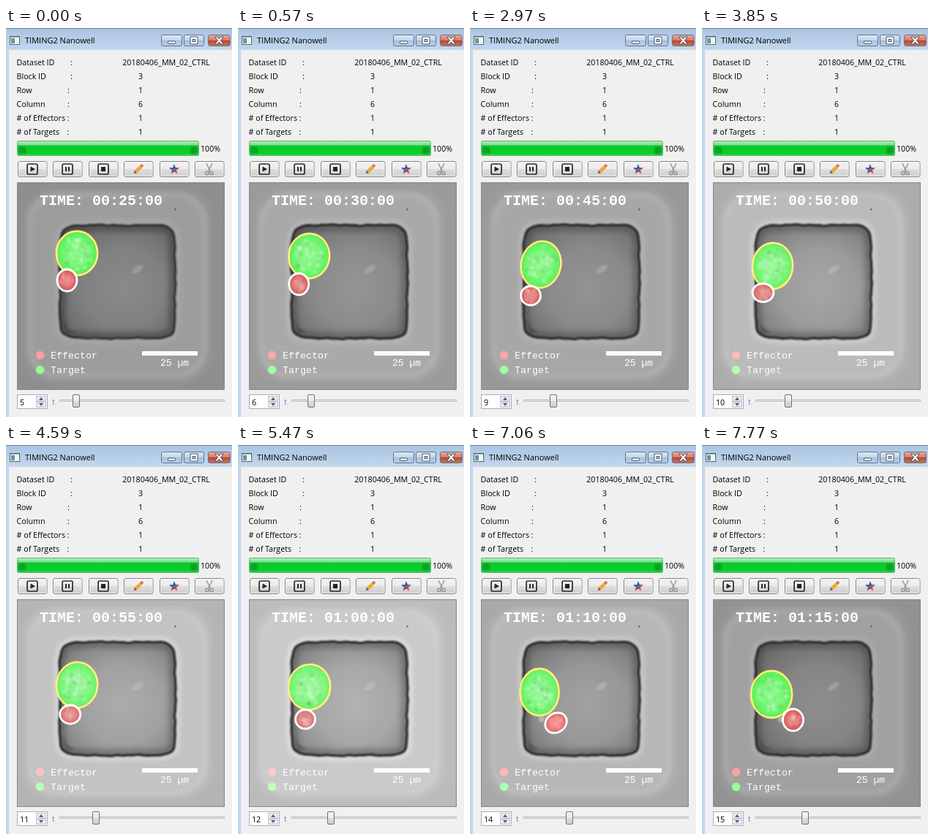
Write an HTML page that moves like this. It is 309 by 532 pixels and loops after 8 s.

```html
<!DOCTYPE html>
<html lang="en">
<head>
<meta charset="utf-8">
<title>Nanowell viewer</title>
<style>
html, body { margin: 0; width: 100%; height: 100%; overflow: hidden; background: #f0f0f0; }
svg { display: block; width: 309px; height: 532px; }
text { font: 10.7px "Open Sans", sans-serif; fill: #000; white-space: pre; }
.title { font-size: 11px; }
.mono { font: 13.33px "Liberation Mono", monospace; fill: #fff; }
.clock { font-size: 20px; font-weight: bold; }
.scale { font-size: 13px; }
</style>
</head>
<body>
<svg viewBox="0 0 309 532">
  <defs>
    <linearGradient id="bar" x2="0" y2="1">
      <stop stop-color="#a9c4e1"/><stop offset="1" stop-color="#c3d7ed"/>
    </linearGradient>
    <linearGradient id="button" x2="0" y2="1">
      <stop stop-color="#f3f3f3"/><stop offset=".5" stop-color="#ebebeb"/>
      <stop offset=".5" stop-color="#dddddd"/><stop offset="1" stop-color="#cfcfcf"/>
    </linearGradient>
    <linearGradient id="glass" x2="0" y2="1">
      <stop stop-color="#dfe9f5"/><stop offset=".48" stop-color="#c3d5e9"/>
      <stop offset=".5" stop-color="#a5bdd8"/><stop offset="1" stop-color="#bdd3ea"/>
    </linearGradient>
    <linearGradient id="close" x2="0" y2="1">
      <stop stop-color="#e6ad9f"/><stop offset=".48" stop-color="#d27a66"/>
      <stop offset=".5" stop-color="#bf4128"/><stop offset="1" stop-color="#d0745a"/>
    </linearGradient>
    <linearGradient id="progress" x2="0" y2="1">
      <stop stop-color="#b5efbd"/><stop offset=".25" stop-color="#7fe08d"/>
      <stop offset=".34" stop-color="#0bcb2c"/><stop offset=".85" stop-color="#06cf2a"/>
      <stop offset="1" stop-color="#35dc50"/>
    </linearGradient>
    <radialGradient id="floor" cx=".55" cy=".55" r=".68">
      <stop id="floorIn"/><stop id="floorMid" offset=".5"/><stop id="floorOut" offset="1"/>
    </radialGradient>
    <radialGradient id="sheen">
      <stop stop-color="#fff" stop-opacity=".34"/><stop offset=".6" stop-color="#fff" stop-opacity=".2"/>
      <stop offset="1" stop-color="#fff" stop-opacity="0"/>
    </radialGradient>
    <filter id="soft1" x="-20%" y="-20%" width="140%" height="140%"><feGaussianBlur stdDeviation=".9"/></filter>
    <filter id="soft3" x="-20%" y="-20%" width="140%" height="140%"><feGaussianBlur stdDeviation="3"/></filter>
    <filter id="soft9" x="-20%" y="-20%" width="140%" height="140%"><feGaussianBlur stdDeviation="8"/></filter>
    <clipPath id="view"><rect x="16" y="212" width="282" height="282"/></clipPath>
    <clipPath id="inside"><path class="well"/></clipPath>
  </defs>

  <rect width="309" height="532" fill="#f0f0f0"/>
  <rect width="309" height="30" fill="url(#bar)"/>
  <rect y="30" width="4" height="502" fill="#c3d7ed"/>
  <path d="M0 .5H309" stroke="#6f8299"/>
  <path d="M4.5 30V532" stroke="#e4edf6"/>
  <rect x="5.5" y="11.5" width="13" height="11" fill="#f4f7f8" stroke="#5c6670"/>
  <path d="M6 12.500H18" stroke="#8fa6bd"/>
  <rect x="7" y="14" width="5" height="7" fill="#5c9a94"/>
  <text class="title" x="26" y="21">TIMING2 Nanowell</text>
  <g id="caption"></g>
  <g id="info"></g>

  <rect x="15.5" y="154.5" width="248" height="20" rx="2" fill="url(#progress)" stroke="#6cae76"/>
  <g fill="#07912a" opacity=".75" filter="url(#soft1)">
    <rect x="17" y="162" width="10" height="10" rx="4"/><rect x="252" y="162" width="10" height="10" rx="4"/>
  </g>
  <text x="266" y="169">100%</text>
  <g id="tools"></g>

  <g clip-path="url(#view)">
    <rect id="edge" x="16" y="212" width="282" height="282"/>
    <rect id="glow" x="28" y="224" width="250" height="256" rx="38" filter="url(#soft9)"/>
    <rect x="32" y="228" width="240" height="248" rx="40" fill="none" stroke="#fff" stroke-width="6" opacity=".14" filter="url(#soft3)"/>
    <path id="halo" class="well" fill="none" stroke="#fff" stroke-width="14" filter="url(#soft3)"/>
    <path class="well" fill="url(#floor)"/>
    <g clip-path="url(#inside)">
      <path class="well" id="shade" fill="none" stroke="#222" stroke-width="18" filter="url(#soft3)"/>
      <path d="M77 393q2 18 18 23l-14 2z" fill="#333" opacity=".3" filter="url(#soft1)"/>
      <ellipse cx="180" cy="330" rx="9" ry="4" transform="rotate(-35 180 330)" fill="#eee" opacity=".22" filter="url(#soft1)"/>
    </g>
    <path class="well" id="wall" fill="none" stroke="#262626" filter="url(#soft1)"/>
    <circle cx="231.5" cy="248" r="1.5" fill="#555" opacity=".7"/>
    <g id="cells"></g>
    <text class="mono clock" id="clock" x="46" y="242"></text>
    <circle id="redDot" cx="46.5" cy="447.5" r="5.7"/>
    <circle id="greenDot" cx="46.5" cy="467.5" r="5.7"/>
    <text class="mono" x="61" y="452">Effector</text>
    <text class="mono" x="61" y="472">Target</text>
    <rect x="186" y="442" width="76" height="6" fill="#fff"/>
    <text class="mono scale" x="211" y="462">25 µm</text>
  </g>
  <rect x="15.5" y="211.5" width="283" height="283" fill="none" stroke="#82868c"/>

  <rect x="15.5" y="501.5" width="41" height="19" fill="#fff" stroke="#abadb3"/>
  <g fill="#e6e8ec" stroke="#c3c7ce">
    <rect x="41.5" y="503.5" width="13" height="7"/><rect x="41.5" y="511.5" width="13" height="7"/>
  </g>
  <path d="M45 509l3-4 3 4zM45 513l3 4 3-4z" fill="#4b5f8c"/>
  <text id="count" x="19" y="516"></text>
  <text x="63" y="515" style="fill:#7b8499">t</text>
  <rect x="73.5" y="508.5" width="225" height="2" fill="#e7eaea" stroke="#b9bcbf"/>
  <rect id="thumb" y="501.5" width="9" height="17" rx="1.5" fill="url(#button)" stroke="#707070"/>
</svg>

<script>
const $ = id => document.getElementById(id);
const set = (id, attrs) => Object.entries(attrs).forEach(([k, v]) => $(id).setAttribute(k, v));
const gray = v => `rgb(${v},${v},${v})`;

// Window controls
const control = (x, w, fill, icon) =>
  `<rect x="${x}.5" y="9.5" width="${w}" height="15" rx="2.5" fill="url(#${fill})" stroke="#60758e"/>
   <g transform="translate(${x + w / 2 + .5} 17)" stroke="#465366" fill="#fff">${icon}</g>`;
$('caption').innerHTML =
  control(212, 28, 'glass', '<rect x="-5" y="1" width="10" height="3.5" rx="1"/>') +
  control(243, 27, 'glass', '<path d="M-5-5H5V5H-5zM-2-1.5H2V1.5H-2z" fill-rule="evenodd"/>') +
  control(276, 30, 'close', '<path d="M-6-5h3.5L0-2l2.500-3H6L2 0l4 5H2.500L0 2l-2.500 3H-6l4-5z"/>');

// Information rows
const rows = [['Dataset ID', '20180406_MM_02_CTRL', 88], ['Block ID', 3, 88], ['Row', 1, 84],
  ['Column', 6, 84], ['# of Effectors', 1, 83.5], ['# of Targets', 1, 83.5]];
$('info').innerHTML = rows.map(([label, value, colon], i) => {
  const y = 51 + 19 * i;
  return `<text x="14.5" y="${y}">${label}</text><text x="${colon}" y="${y}">:</text>
    <text x="${i ? 184 : 219}" y="${y}" text-anchor="middle">${value}</text>`;
}).join('');

// Toolbar
const frame = '<rect x="-7" y="-7" width="14" height="14" rx="2" fill="none" stroke="#2b2b2b" stroke-width="1.7"/>';
const starPoints = Array.from({ length: 10 }, (_, i) => {
  const r = i % 2 ? 3 : 7.5, a = i * Math.PI / 5 - Math.PI / 2;
  return [r * Math.cos(a), r * Math.sin(a) + .5].map(v => v.toFixed(1));
});
const star = starPoints.map((p, i) =>
  `<path d="M0 .5L${p}L${starPoints[(i + 1) % 10]}z" fill="${i > 1 && i < 6 ? '#cf3040' : '#274f9c'}"/>`).join('');
const icons = [
  frame + '<path d="M-2.500-3.500L4 0L-2.500 3.500z" fill="#222"/>',
  frame + '<path d="M-2-3V3M2-3V3" stroke="#222" stroke-width="2"/>',
  frame + '<rect x="-3" y="-3" width="6" height="6" fill="#222"/>',
  `<g transform="rotate(45)"><rect x="-2" y="-5" width="4" height="10" fill="#f6ae27" stroke="#cc8a25" stroke-width=".6"/>
   <rect x="-2" y="-8.500" width="4" height="3.500" rx="1" fill="#e36b5b"/><path d="M-2 5h4L0 9z" fill="#75562f"/></g>`,
  star,
  `<g fill="none" stroke="#8d8d8d" stroke-width="1.300"><path d="M-4-8L2 4M4-8L-2 4"/>
   <circle cx="-3" cy="5.500" r="2.200"/><circle cx="3" cy="5.500" r="2.200"/></g>`
];
$('tools').innerHTML = icons.map((icon, i) => {
  const x = 16.5 + Math.round(48.4 * i);
  return `<rect x="${x}" y="182.5" width="39.5" height="21" rx="2.5" fill="url(#button)" stroke="#858585"/>
    <rect x="${x + 1}" y="183.5" width="37.5" height="19" rx="1.500" fill="none" stroke="#fafafa" opacity=".7"/>
    <g transform="translate(${x + 19.5} 193)">${icon}</g>`;
}).join('');

// Slightly wavy rounded square
function wellPath() {
  const n = 9, points = [];
  for (let i = 0; i < 240; i++) {
    const a = i * Math.PI / 120, c = Math.cos(a), s = Math.sin(a);
    const r = (Math.abs(c) ** n + Math.abs(s) ** n) ** (-1 / n);
    const wave = .5 * Math.sin(7 * a + 2) + .35 * Math.sin(19 * a) + .3 * Math.sin(34 * a + 1);
    points.push(`${(152.5 + c * (79 * r + wave)).toFixed(1)} ${(347 + s * (77.5 * r + wave)).toFixed(1)}`);
  }
  return `M${points.join('L')}z`;
}
const well = wellPath();
document.querySelectorAll('.well').forEach(p => p.setAttribute('d', well));

function random(seed) {
  return () => (seed = seed * 16807 % 2147483647) / 2147483647;
}

// step: brightness, target x y rx ry tilt, effector x y rx ry tilt
const keys = {
  5: [152, 97, 308, 28, 30, 0, 83.5, 345, 13.5, 15, 0],
  7: [176, 97.5, 315.5, 27.5, 31, 10, 83, 355.5, 13.5, 14.5, 0],
  9: [162, 97, 323.5, 27, 32, 14, 83, 366, 13.5, 13, 0],
  10: [182, 96.5, 325.5, 27.5, 31.5, 5, 83.5, 362, 14.5, 12.5, 0],
  12: [197, 97.5, 331, 28.5, 31, 10, 92, 375, 13.5, 13, 0],
  14: [178, 95, 338, 26.5, 32, 0, 117.5, 380, 15.5, 13, -35],
  15: [156, 95, 341, 28, 32, 0, 124.5, 376, 14, 15, 0]
};
const stateAt = n => keys[n] || keys[n - 1].map((v, i) => (v + keys[n + 1][i]) / 2);

function cell(x, y, rx, ry, tilt, color, rim, spots, rand) {
  let marks = '';
  for (let i = 0; i < spots; i++) {
    const a = rand() * 6.283, r = Math.sqrt(rand()) * .78;
    marks += `<circle cx="${(r * rx * Math.cos(a)).toFixed(1)}" cy="${(r * ry * Math.sin(a)).toFixed(1)}"
      r="${(1 + 1.8 * rand()).toFixed(1)}" fill="${i % 3 ? '#fff' : '#243c24'}" opacity="${i % 3 ? .25 : .12}"/>`;
  }
  return `<g transform="translate(${x} ${y}) rotate(${tilt})">
    <ellipse rx="${rx - 1.5}" ry="${ry - 1.5}" fill="${color}"/>
    <ellipse rx="${rx - 2}" ry="${ry - 2}" fill="url(#sheen)"/>
    <g filter="url(#soft1)">${marks}</g>
    <ellipse rx="${rx}" ry="${ry}" fill="none" stroke="${rim}" stroke-width="2.800"/></g>`;
}

function draw(n) {
  const [g, tx, ty, trx, try_, tt, ex, ey, erx, ery, et] = stateAt(n);
  const first = n === 5, k = Math.round(g * .56), rand = random(n * 7919);
  set('edge', { fill: gray(g - 10) });
  set('glow', { fill: gray(g + 5) });
  set('halo', { opacity: first ? .1 : Math.max(.12, (g - 140) / 150) });
  set('floorIn', { 'stop-color': gray(g * .91) });
  set('floorMid', { 'stop-color': gray(g * .85) });
  set('floorOut', { 'stop-color': gray(g * .66) });
  set('shade', { opacity: first ? .35 : .25 });
  set('wall', { 'stroke-width': first ? 2.8 : 3.4, opacity: first ? .85 : .92 });
  set('redDot', { fill: `rgb(255,${g + 4},${g + 4})` });
  set('greenDot', { fill: `rgb(${g - 6},255,${g - 6})` });

  const debris = n > 13 ? `<circle cx="${n === 14 ? 98 : 108}" cy="375" r="4" fill="#c5dfc0" opacity=".6" filter="url(#soft1)"/>` : '';
  const red = `rgb(${n === 14 ? 240 : 222},${k + 5},${k + 5})`;
  $('cells').innerHTML = debris +
    cell(tx, ty, trx, try_, tt, `rgb(${k},244,${k})`, '#fff07a', 60, rand) +
    cell(ex, ey, erx, ery, et, red, '#fff', 9, rand);

  const minutes = n * 5, pad = v => String(v).padStart(2, '0');
  $('clock').textContent = `TIME: ${pad(Math.floor(minutes / 60))}:${pad(minutes % 60)}:00`;
  $('count').textContent = n;
  set('thumb', { x: Math.floor(96 + 4.5 * (n - 5)) - 4.5 });
}

const starts = [0, 570, 1340, 2230, 2970, 3850, 4590, 5470, 6210, 7060, 7770];
let shown;
function tick() {
  const t = performance.now() % 8000;
  const n = 4 + starts.filter(s => s <= t).length;
  if (n !== shown) draw(shown = n);
  requestAnimationFrame(tick);
}
tick();
</script>
</body>
</html>
```
